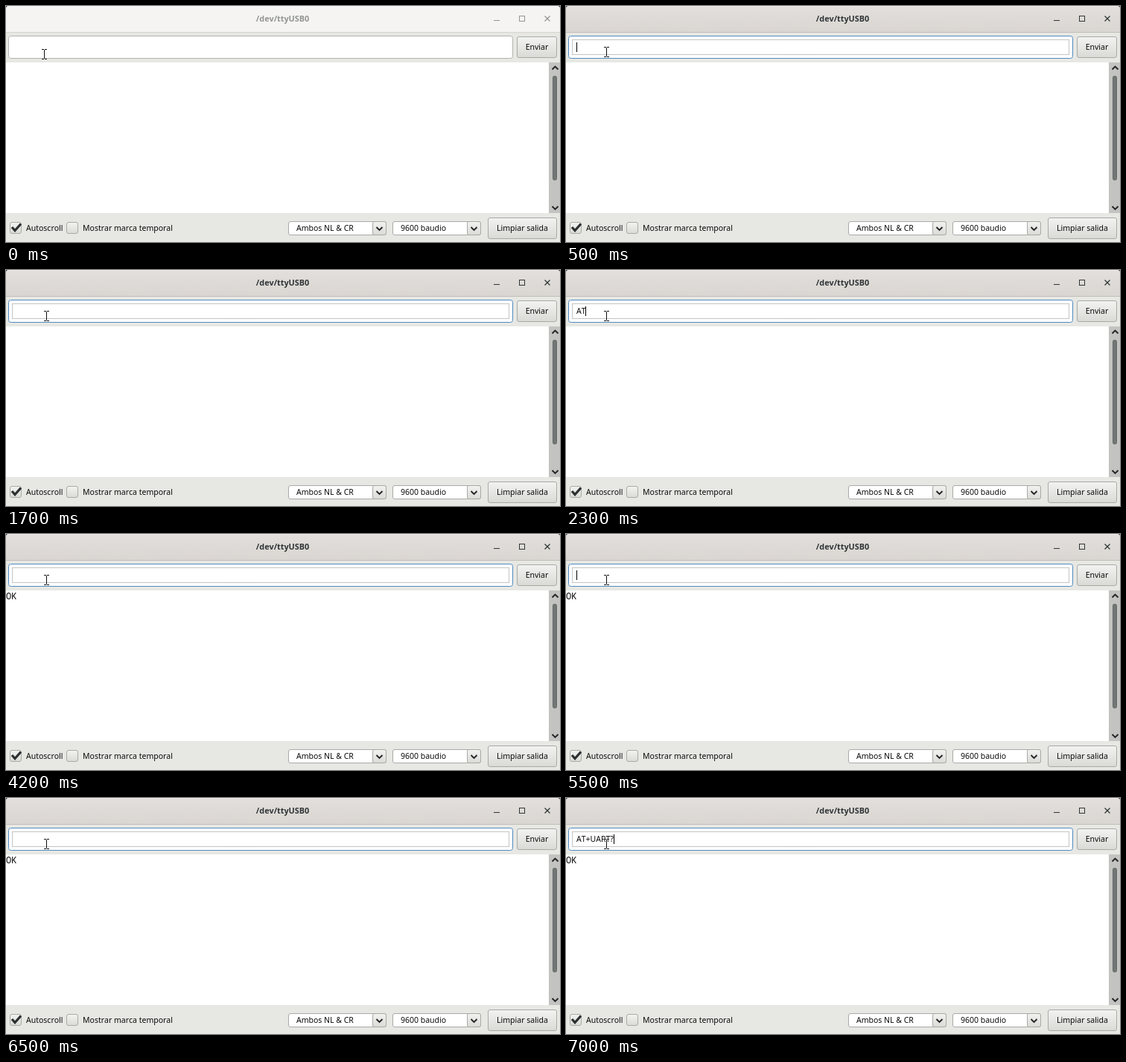
Recreate the animation shown at these times as an HTML page with a canvas. Size 744 by 318 pixels, loop 8000 ms.

```html
<!DOCTYPE html>
<html lang="es">
<head>
<meta charset="utf-8">
<title>/dev/ttyUSB0</title>
<style>
html, body { margin: 0; width: 744px; height: 318px; overflow: hidden; }
canvas { display: block; }
</style>
</head>
<body>
<canvas id="stage" width="744" height="318"></canvas>
<script>
const ctx = document.getElementById('stage').getContext('2d');
const LOOP = 8000;
const UI_FONT = '10.5px "Noto Sans", "Open Sans", sans-serif';
const TITLE_FONT = 'bold 10.8px "Noto Sans", "Open Sans", sans-serif';
const MONO_FONT = '12px "Noto Sans Mono", monospace';
const INK = '#0c0c0c';
const PANEL = '#e7e8e4';
const BORDER = '#a9aaa6';

// [start ms, typed text, caret x (0 = hidden)]
const inputSteps = [
  [0, '', 0], [500, '', 14], [1700, '', 0], [1800, 'A', 21],
  [2300, 'AT', 26], [2900, '', 14], [4200, '', 0], [5500, '', 14],
  [6500, '', 0], [6700, 'AT', 26], [7000, 'AT+UART?', 64]
];

function rect(x, y, w, h, color) {
  ctx.fillStyle = color;
  ctx.fillRect(x, y, w, h);
}

function label(text, x, y, align = 'left', font = UI_FONT, color = INK) {
  ctx.font = font;
  ctx.textAlign = align;
  ctx.fillStyle = color;
  ctx.fillText(text, x, y);
}

function line(points, color, width = 1) {
  ctx.beginPath();
  points.forEach(([x, y]) => ctx.lineTo(x, y));
  ctx.strokeStyle = color;
  ctx.lineWidth = width;
  ctx.stroke();
}

function box(x, y, w, h, fill, stroke = BORDER, radius = 2.5) {
  ctx.beginPath();
  ctx.roundRect(x + 0.5, y + 0.5, w - 1, h - 1, radius);
  ctx.fillStyle = fill;
  ctx.fill();
  ctx.strokeStyle = stroke;
  ctx.lineWidth = 1;
  ctx.stroke();
}

function vertical(y, h, top, bottom) {
  const gradient = ctx.createLinearGradient(0, y, 0, y + h);
  gradient.addColorStop(0, top);
  gradient.addColorStop(1, bottom);
  return gradient;
}

function raised(x, y, w, h, radius) {
  box(x, y, w, h, vertical(y, h, '#f3f3f1', '#d9dad6'), BORDER, radius);
}

function button(text, x, y, w, h) {
  raised(x, y, w, h);
  label(text, x + w / 2, y + h / 2 + 3.5, 'center');
}

function chevron(x, y, direction) {
  line([[x - 4, y - 2 * direction], [x, y + 2 * direction], [x + 4, y - 2 * direction]], '#222', 1.8);
}

function combo(text, x, w) {
  box(x, 290, w, 19, '#fff');
  raised(x + w - 19, 290, 19, 19);
  label(text, x + 11, 303);
  chevron(x + w - 9.5, 300, 1);
}

function titleBar(active) {
  const color = active ? '#2e3436' : '#929594';
  rect(0, 0, 744, 4, '#222');
  ctx.beginPath();
  ctx.roundRect(0, 0, 744, 36, [3, 3, 0, 0]);
  ctx.fillStyle = active ? vertical(0, 35, '#e2dfdc', '#dad6d2') : '#f5f4f2';
  ctx.fill();
  rect(3, 0, 738, 1, active ? '#efedeb' : '#f8f7f6');
  rect(0, 35, 744, 1, active ? '#c2bdb7' : '#d8d4d0');
  label('/dev/ttyUSB0', 371.5, 21, 'center', TITLE_FONT, color);
  rect(655, 19, 8, 1, color);
  ctx.strokeStyle = color;
  ctx.lineWidth = 1;
  ctx.strokeRect(689.5, 13.5, 7, 7);
  line([[723.5, 13.5], [730.5, 20.5]], color, 1.3);
  line([[730.5, 13.5], [723.5, 20.5]], color, 1.3);
}

function inputField(active, text, caretX) {
  box(3, 40, 678, 31, '#fff', active ? '#4f8abf' : '#b3b4b0', 3);
  if (active) {
    ctx.setLineDash([1, 1]);
    ctx.strokeStyle = '#888';
    ctx.strokeRect(8.5, 45.5, 667, 20);
    ctx.setLineDash([]);
  }
  label(text, 14, 59);
  if (caretX) rect(caretX, 49, 1, 13, '#000');
}

function outputArea(text) {
  rect(0, 76, 729, 203, '#fff');
  label(text, 0, 88, 'left', MONO_FONT);
  rect(729, 76, 15, 203, '#c3c3c2');
  box(734, 94, 6, 141, '#727776', '#656a69', 2);
  chevron(737.5, 83.5, -1);
  chevron(737.5, 272, 1);
}

function bottomBar() {
  raised(5, 291, 16, 16);
  line([[8, 298], [12, 302.5], [20, 293.5]], '#2b2f30', 3.2);
  label('Autoscroll', 27, 303);
  raised(81, 291, 16, 16);
  label('Mostrar marca temporal', 103, 303);
  combo('Ambos NL & CR', 379, 132);
  combo('9600 baudio', 519, 119);
  button('Limpiar salida', 647, 285, 93, 29);
}

function pointer(x, y) {
  const parts = [[-3, -7, 3, 1], [1, -7, 3, 1], [0, -6, 1, 12], [-3, 6, 3, 1], [1, 6, 3, 1]];
  parts.forEach(([dx, dy, w, h]) => rect(x + dx - 0.5, y + dy - 0.5, w + 1, h + 1, 'rgba(255,255,255,.7)'));
  parts.forEach(([dx, dy, w, h]) => rect(x + dx, y + dy, w, h, '#111'));
}

function draw(now) {
  const t = now % LOOP;
  const active = t >= 500;
  const [, text, caretX] = inputSteps.findLast(([start]) => t >= start);
  ctx.fontKerning = 'none';
  rect(0, 0, 744, 318, PANEL);
  titleBar(active);
  inputField(active, text, caretX);
  button('Enviar', 686, 41, 54, 29);
  outputArea(t >= 2900 ? 'OK' : '');
  bottomBar();
  if (active) pointer(54, 62);
  else pointer(51, 65);
}

const begin = performance.now();
function tick() {
  draw(performance.now() - begin);
  requestAnimationFrame(tick);
}
tick();
</script>
</body>
</html>
```
